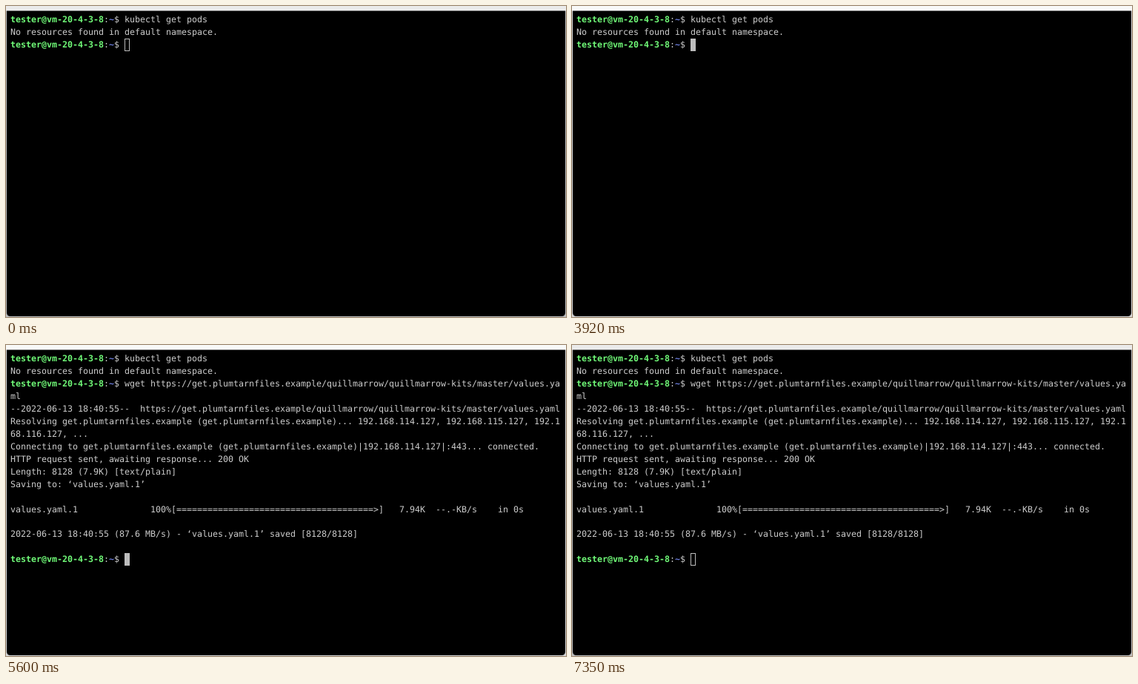
These frames come from a looping animation (756x420 px, 8 s). An HTML page:

```html
<!DOCTYPE html>
<html lang="en">
<head>
<meta charset="utf-8">
<title>Terminal session</title>
<style>
  html, body { margin: 0; width: 100%; height: 100%; overflow: hidden; background: #000; }
  svg { display: block; width: 756px; height: 420px; }
  text {
    font: 11.645px "DejaVu Sans Mono", "Liberation Mono", monospace;
    fill: #cdcdcd; white-space: pre; text-rendering: geometricPrecision;
  }
  .user { font-weight: bold; fill: #70fa78; }
  .path { font-weight: bold; fill: #6c7ede; }
</style>
</head>
<body>
<svg viewBox="0 0 756 420">
  <rect id="edge" width="756" height="420"/>
  <path d="M1 6H755V414Q755 419 750 419H6Q1 419 1 414Z"/>
  <rect id="bar" width="756" height="6.5"/>
  <g id="screen"></g>
  <rect id="cursor"/>
</svg>
<script>
const LOOP = 8000, COLS = 106, CELL = 7.01, ROW = 16.96, LEFT = 6, TOP = 10, BASE = 22;
const FOCUS = 3850, PASTE = 4760, REQUEST = 5530, SAVED = 5600, BLUR = 7280;

const NS = "http://www.w3.org/2000/svg";
const $ = id => document.getElementById(id);

const user = "tester@vm-20-4-3-8";
const prompt = user + ":~$ ";
const host = "get.plumtarnfiles.example";
const url = `https://${host}/quillmarrow/quillmarrow-kits/master/values.yaml`;
const ips = [114, 115, 116].map(n => `192.168.${n}.127`);
const stamp = "2022-06-13 18:40:55";

const intro = [prompt + "kubectl get pods", "No resources found in default namespace."];
const command = prompt + "wget " + url;
const request = [
  `--${stamp}--  ${url}`,
  `Resolving ${host} (${host})... ${ips.join(", ")}, ...`,
  `Connecting to ${host} (${host})|${ips[0]}|:443... connected.`
];
const waiting = "HTTP request sent, awaiting response... ";
const progress = "values.yaml.1".padEnd(27) + "100%[" + "=".repeat(38) + ">]   7.94K  --.-KB/s    in 0s";
const result = [
  waiting + "200 OK",
  "Length: 8128 (7.9K) [text/plain]",
  "Saving to: ‘values.yaml.1’",
  "",
  progress,
  "",
  `${stamp} (87.6 MB/s) - ‘values.yaml.1’ saved [8128/8128]`,
  "",
  prompt
];

function linesAt(t) {
  if (t < PASTE) return [...intro, prompt];
  if (t < REQUEST) return [...intro, command];
  if (t < SAVED) return [...intro, command, ...request, waiting];
  return [...intro, command, ...request, ...result];
}

const wrap = line => line.match(new RegExp(`.{1,${COLS}}`, "g")) || [""];

function setAttrs(el, attrs) {
  for (const key in attrs) el.setAttribute(key, attrs[key]);
}

function make(tag, attrs, parent) {
  const el = document.createElementNS(NS, tag);
  setAttrs(el, attrs);
  parent.appendChild(el);
  return el;
}

function addRow(line, row) {
  const text = make("text", { x: LEFT, y: BASE + row * ROW }, $("screen"));
  const parts = line.startsWith(prompt)
    ? [["user", user], ["", ":"], ["path", "~"], ["", line.slice(user.length + 2)]]
    : [["", line]];
  for (const [cls, str] of parts) make("tspan", { class: cls }, text).textContent = str;
}

function drawScreen(lines) {
  const rows = lines.flatMap(wrap);
  $("screen").replaceChildren();
  rows.forEach(addRow);
  return { row: rows.length - 1, col: rows[rows.length - 1].length };
}

function drawCursor({ row, col }, active) {
  const inset = active ? 0 : 0.5;
  setAttrs($("cursor"), {
    x: Math.round(LEFT + col * CELL) + inset,
    y: Math.round(TOP + row * ROW) + inset,
    width: 7 - 2 * inset,
    height: 17 - 2 * inset,
    fill: active ? "#bcbcbc" : "none",
    stroke: active ? "none" : "#bcbcbc"
  });
}

function render(t) {
  const active = t >= FOCUS && t < BLUR;
  drawCursor(drawScreen(linesAt(t)), active);
  $("bar").setAttribute("fill", active ? "#f9faf9" : "#ebebeb");
  $("edge").setAttribute("fill", active ? "#d4d4d4" : "#bcbcbc");
}

const cuts = [FOCUS, PASTE, REQUEST, SAVED, BLUR];
let shown = -1;

function tick() {
  const t = performance.now() % LOOP;
  const stage = cuts.filter(c => t >= c).length;
  if (stage !== shown) {
    shown = stage;
    render(t);
  }
  requestAnimationFrame(tick);
}
tick();
</script>
</body>
</html>
```
